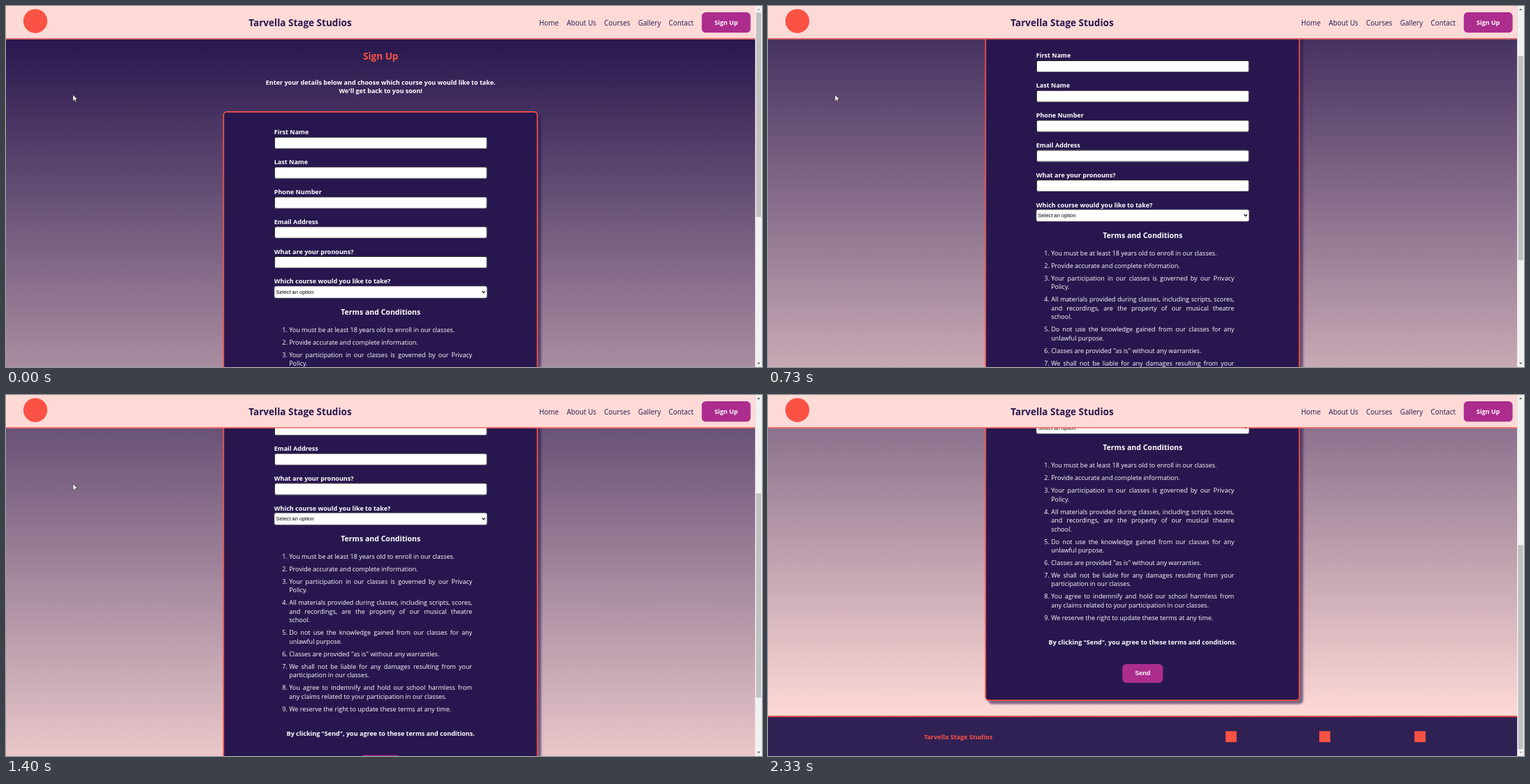
Write an HTML page that moves like this. It is 1082x518 px and loops after 3 s.

```html
<!DOCTYPE html>
<html lang="en">
<head>
<meta charset="utf-8">
<title>Sign Up</title>
<style>
  :root { --coral: #fa5245; --navy: #28174e; --pink: #fedad7; --magenta: #ac2d8d; }
  html, body { margin: 0; width: 100%; height: 100%; overflow: hidden; }
  /* Laid out at 1920 px wide, shown on a 1082 px stage */
  #view {
    position: absolute; width: 1920px; height: 920px; overflow: hidden;
    transform: scale(.56354); transform-origin: 0 0;
    font: 16px/22px "Open Sans", sans-serif; color: #fff;
  }
  #view * { box-sizing: border-box; }
  #page, #page > *, header > *, footer > *, #bar, #bar > *, #cursor { position: absolute; }
  #page { left: 0; top: 0; width: 1903px; height: 1566px; }
  #page > .line { left: 0; width: 1903px; text-align: center; font-weight: 700; white-space: nowrap; }
  .back { top: 84px; width: 1903px; height: 1378px; background: linear-gradient(var(--navy), var(--pink)); }
  .card {
    left: 551px; top: 268px; width: 800px; height: 1156px; border: 3px solid var(--coral);
    border-radius: 10px; background: var(--navy); box-shadow: 8px 8px 5px rgba(40, 23, 78, .6);
  }
  .label { left: 681px; font-weight: 700; }
  .field, select { left: 681px; width: 541px; height: 31px; border-radius: 5px; background: #fff; }
  .field { border: 2px inset #767676; }
  select { border: 1px solid #767676; color: #000; font: 13.333px "Liberation Sans", Arial, sans-serif; }
  ol { left: 719px; top: 813px; width: 465px; margin: 0; padding: 0; text-align: justify; }
  li { margin-bottom: 10px; }
  .button {
    display: flex; align-items: center; justify-content: center;
    border-radius: 10px; background: var(--magenta); font-weight: 700;
  }
  .send { left: 900px; top: 1330px; width: 103px; height: 48px; font-family: "Liberation Sans", Arial, sans-serif; }
  header {
    position: absolute; left: 0; top: 0; width: 1903px; height: 84px; color: var(--navy);
    background: var(--pink); border-bottom: 2px solid var(--coral); box-shadow: 0 1px 2px rgba(250, 82, 69, .4);
  }
  .logo { left: 44px; top: 8px; width: 61px; height: 61px; border-radius: 50%; background: var(--coral); }
  .title { left: 747px; top: 25px; transform: translateX(-50%); font: 700 24px/33px "Open Sans", sans-serif; white-space: nowrap; }
  nav { left: 1354px; top: 30px; display: flex; gap: 20px; font-size: 17.6px; line-height: 24px; white-space: nowrap; }
  header .button { left: 1767px; top: 16px; width: 124px; height: 52px; color: #fff; }
  footer { top: 1462px; width: 1903px; height: 104px; background: #2f2154; border-top: 3px solid var(--coral); }
  footer b { left: 396px; top: 39px; color: var(--coral); }
  footer i { top: 36px; width: 28px; height: 28px; background: var(--coral); }
  #bar { left: 1903px; top: 0; width: 17px; height: 920px; background: #f1f1f1; }
  #thumb { left: 2px; top: 17px; width: 13px; height: 520px; background: #c1c1c1; }
  #bar svg { left: 0; top: 0; }
  #cursor { left: 0; top: 0; }
</style>
</head>
<body>
<div id="view">
  <div id="page">
    <div class="back"></div>
    <div class="line" style="top:110px;font-size:24px;line-height:33px;color:var(--coral)">Sign Up</div>
    <div class="line" style="top:183px">Enter your details below and choose which course you would like to take.<br>We'll get back to you soon!</div>
    <div class="card"></div>
    <select style="top:713px"><option>Select an option</option></select>
    <div class="line" style="top:766px;font-size:18.72px;line-height:26px">Terms and Conditions</div>
    <ol>
      <li>You must be at least 18 years old to enroll in our classes.</li>
      <li>Provide accurate and complete information.</li>
      <li>Your participation in our classes is governed by our Privacy Policy.</li>
      <li>All materials provided during classes, including scripts, scores, and recordings, are the property of our musical theatre school.</li>
      <li>Do not use the knowledge gained from our classes for any unlawful purpose.</li>
      <li>Classes are provided "as is" without any warranties.</li>
      <li>We shall not be liable for any damages resulting from your participation in our classes.</li>
      <li>You agree to indemnify and hold our school harmless from any claims related to your participation in our classes.</li>
      <li>We reserve the right to update these terms at any time.</li>
    </ol>
    <div class="line" style="top:1264px">By clicking "Send", you agree to these terms and conditions.</div>
    <div class="button send">Send</div>
    <footer>
      <b>Tarvella Stage Studios</b>
      <i style="left:1162px"></i><i style="left:1400px"></i><i style="left:1642px"></i>
    </footer>
  </div>
  <header>
    <div class="logo"></div>
    <div class="title">Tarvella Stage Studios</div>
    <nav><span>Home</span><span>About Us</span><span>Courses</span><span>Gallery</span><span>Contact</span></nav>
    <div class="button">Sign Up</div>
  </header>
  <div id="bar">
    <div id="thumb"></div>
    <svg width="17" height="920"><path id="up" d="M4.500 10.500l4-4 4 4z"/><path id="down" d="M4.500 908l4 4 4-4z"/></svg>
  </div>
  <svg id="cursor" width="14" height="21" viewBox="-1 -1 14 21">
    <path d="M0 0V16.500L3.800 12.900 6.300 18.700 8.800 17.600 6.400 12H11.700Z" fill="#fff" stroke="#000"/>
  </svg>
</div>
<script>
const $ = id => document.getElementById(id);
const page = $("page"), LOOP = 3000, STEP = LOOP / 45;
const MAX_SCROLL = 645, TRACK = 885, PAGE_HEIGHT = 1564;

["First Name", "Last Name", "Phone Number", "Email Address", "What are your pronouns?",
 "Which course would you like to take?"].forEach((text, i) => {
  const add = (name, top, content) => {
    const el = document.createElement("div");
    el.className = name;
    el.style.top = top + 76 * i + "px";
    el.textContent = content;
    page.append(el);
  };
  add("label", 310, text);
  if (i < 5) add("field", 333, "");
});

// Bursts of wheel scrolling: first step, then the offset at each step
const bursts = [
  [6, [36, 78, 112, 140, 168, 195, 199, 200, 250, 323, 382, 400]],
  [21, [413, 450, 493, 534, 580, 615, 638, MAX_SCROLL]]
];

function scrollAt(step) {
  let y = 0;
  for (const [start, offsets] of bursts)
    if (step >= start) y = offsets[Math.min(step - start, offsets.length - 1)];
  return y;
}

function draw(now) {
  const step = Math.floor((now % LOOP + 3.4) / STEP) % 45;
  const y = scrollAt(step);
  page.style.transform = `translateY(${-y}px)`;
  $("thumb").style.transform = `translateY(${y * TRACK / PAGE_HEIGHT}px)`;
  $("up").setAttribute("fill", y > 0 ? "#505050" : "#a3a3a3");
  $("down").setAttribute("fill", y < MAX_SCROLL ? "#505050" : "#a3a3a3");

  // The pointer speeds down to the left, then leaves
  const p = Math.max(0, (step - 30) / 4) ** 2;
  $("cursor").style.transform = `translate(${169 - 84 * p}px, ${225 + 560 * p}px)`;
  $("cursor").style.visibility = step < 35 ? "visible" : "hidden";
}

const begin = performance.now();
function tick() {
  draw(performance.now() - begin);
  requestAnimationFrame(tick);
}
tick();
</script>
</body>
</html>
```
